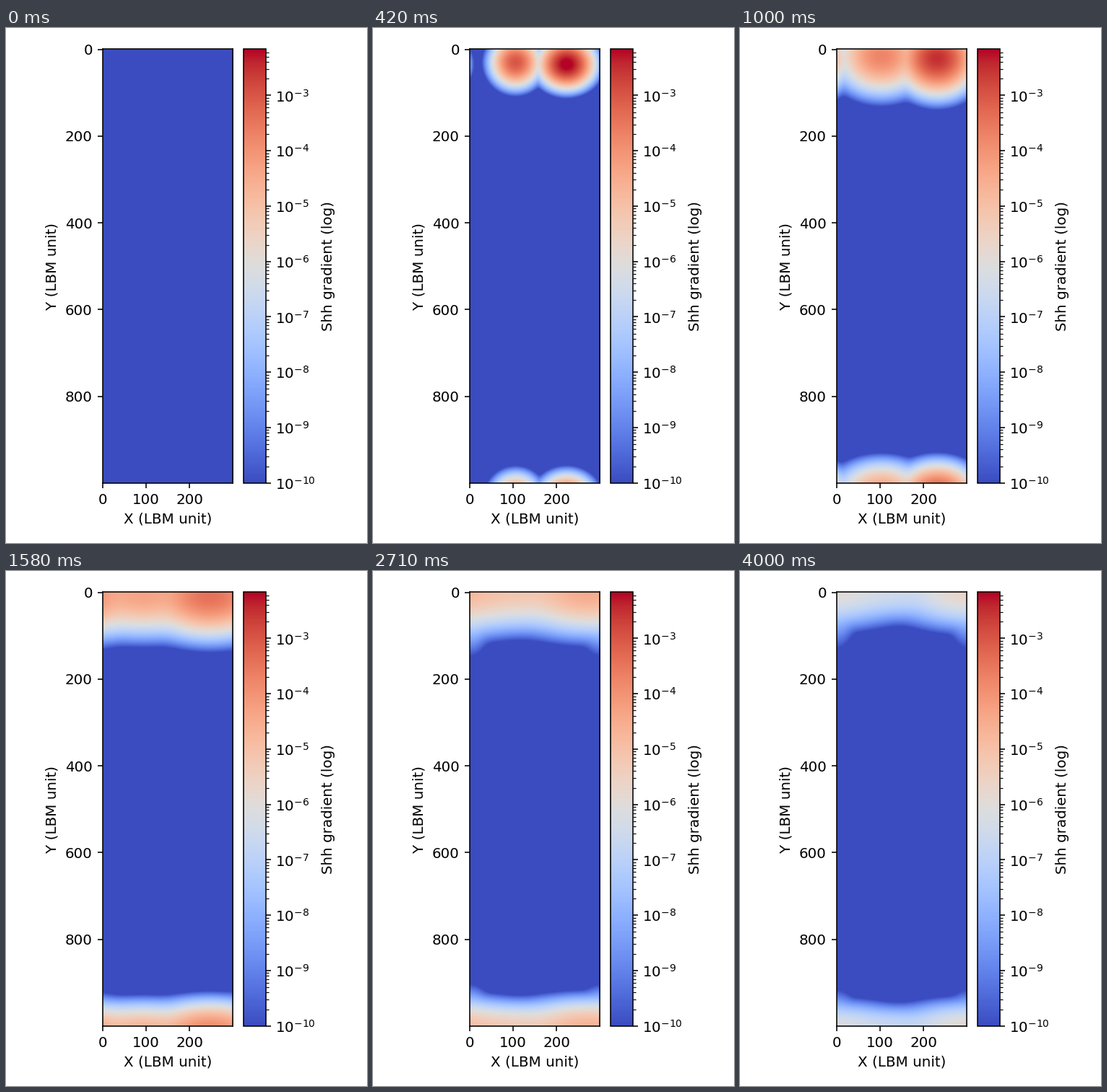
A matplotlib script for the animation above (4.08 s loop, 500x714 px).

```python
import numpy as np
import matplotlib.pyplot as plt
from matplotlib.animation import FuncAnimation
from matplotlib.cm import ScalarMappable
from matplotlib.colors import LogNorm

W, H = 500, 714
DPI = 1000 / 7
EPS = 1e-3  # keeps the pixel size from being floored one short
LOOP, STEP = 4080, 20
STATES = 41
LOW, HIGH = -10, -2.164  # log10 range of the colour scale
WIDTH, HEIGHT = 300, 1000

# Each simulation state is shown from the nearest tick of a 24 Hz clock.
STARTS = np.round(2.4 * np.arange(STATES)) * 1000 / 24

# Gaussian plumes: log10 peak, centre and the distances of one decade's fall.
KEYS = np.log([1, 4, 6, 10, 22, 32, 40])
LEFT = dict(
    peak=[-2.4, -3.0, -3.2, -3.75, -4.75, -5.6, -6.5],
    cx=[106, 105, 103, 102, 85, 105, 110],
    cy=[33, 30, 25, 15, 0, 0, 0],
    sx=[17, 29.5, 36.5, 56, 140, 160, 150],
    down=[17, 30, 36.5, 47, 54, 47, 41],
    up=[17, 28.5, 32.4, 36, 34, 32, 30],
)
RIGHT = dict(
    peak=[-1.4, -2.05, -2.05, -2.5, -4.05, -4.9, -5.7],
    cx=[220, 222, 225, 230, 255, 285, 297],
    cy=[37, 35, 32, 20, 0, 0, 0],
    sx=[20, 32, 37, 47, 108, 110, 105],
    down=[17, 28, 32, 44, 56, 52, 48],
    up=[17, 28.7, 32, 35, 37, 36, 35],
)
# Slow spread along the side walls
WALL = dict(
    peak=[-14, -14, -14, -10, -6.0, -6.6, -7.2],
    cx=[300] * 7, cy=[0] * 7, sx=[33] * 7, down=[77] * 7, up=[52] * 7,
)

x = np.arange(0.5, WIDTH, 2)
y = np.arange(0.5, HEIGHT, 2)
u = np.where(y < HEIGHT / 2, y, y - HEIGHT)  # the domain wraps vertically


def plume(spec, state):
    p = {k: np.interp(np.log(state), KEYS, v) for k, v in spec.items()}
    loss_y = np.interp(state, [4, 10, 22], [0.8, 0.6, 0.2])
    loss_x = 0.0 if spec is WALL else 0.35
    gx = sum(10 ** (-((x - p["cx"] - shift) / p["sx"]) ** 2 - loss)
             for shift, loss in ((0, 0), (-WIDTH, loss_x), (WIDTH, loss_x)))
    dy = u - p["cy"]
    fall = (dy / np.where(dy > 0, p["down"], p["up"])) ** 2
    gy = 10 ** (p["peak"] - fall - loss_y * (u < 0))
    return np.outer(gy, gx)


def field(state):
    if state == 0:
        return np.full((y.size, x.size), float(LOW))
    total = sum(plume(spec, state) for spec in (LEFT, RIGHT, WALL))
    return np.log10(np.maximum(total, 10.0 ** LOW))


fields = [field(s) for s in range(STATES)]

plt.rcParams["font.family"] = "DejaVu Sans"
fig = plt.figure(figsize=((W + EPS) / DPI, (H + EPS) / DPI), dpi=DPI,
                 facecolor="white")


def add_axes(left, top, width, height):
    return fig.add_axes([left / W, 1 - (top + height) / H,
                         width / W, height / H])


ax = add_axes(133.8, 29.3, 180.4, 601.4)
image = ax.imshow(fields[0], cmap="coolwarm", vmin=LOW, vmax=HIGH,
                  extent=(-0.5, WIDTH - 0.5, HEIGHT - 0.5, -0.5),
                  aspect="auto", interpolation="bilinear")
ax.set_xticks([0, 100, 200])
ax.set_yticks(range(0, HEIGHT, 200))
ax.set_xlabel("X (LBM unit)")
ax.set_ylabel("Y (LBM unit)")

scale = ScalarMappable(LogNorm(10.0 ** LOW, 10.0 ** HIGH), "coolwarm")
bar = fig.colorbar(scale, cax=add_axes(329.45, 29.3, 30.1, 601.4))
bar.set_label("Shh gradient (log)")


def update(frame):
    time = (frame + 0.5) * STEP
    state = np.searchsorted(STARTS, time, side="right") - 1
    image.set_data(fields[state])
    return [image]


anim = FuncAnimation(fig, update, frames=LOOP // STEP, interval=STEP,
                     repeat=True, repeat_delay=0)
plt.show()
```
